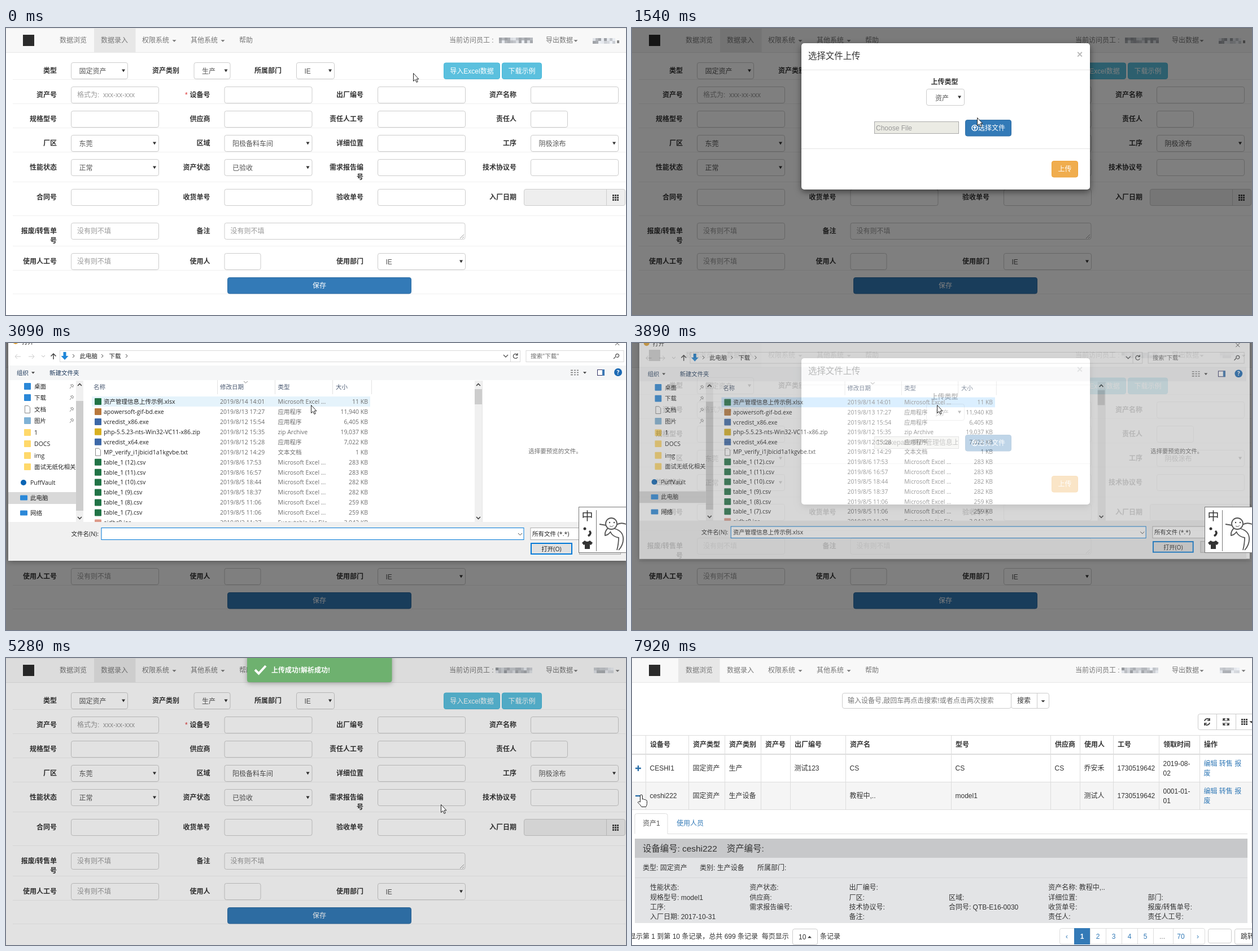
Recreate the animation shown at these times as an HTML page. Size 1098x510 px, loop 8000 ms.

```html
<!DOCTYPE html>
<html lang="zh">
<head>
<meta charset="utf-8">
<style>
html, body { margin: 0; width: 100%; height: 100%; overflow: hidden; background: #fff; }
svg { display: block; font-family: "Liberation Sans", "Noto Sans CJK SC", sans-serif; }
text { white-space: pre; }
#dialog { font-family: "Open Sans", "Noto Sans CJK SC", sans-serif; filter: drop-shadow(0 2px 5px rgba(0,0,0,.3)); }
#modal .card { filter: drop-shadow(0 4px 6px rgba(0,0,0,.5)); }
.b { font-weight: 700; }
.r { text-anchor: end; }
.m { text-anchor: middle; }
</style>
</head>
<body>
<svg id="stage" width="1098" height="510" viewBox="0 0 1098 510"></svg>
<script>
const LOOP = 8000, BLUE = '#337ab7';
const $ = id => document.getElementById(id);

// Drawing helpers; text is placed by its vertical centre
const rect = (x, y, w, h, fill, more = '') => `<rect x="${x}" y="${y}" width="${w}" height="${h}" fill="${fill}" ${more}/>`;
const box = (x, y, w, h, fill = '#fff', stroke = '#ccc', r = 3.4) => rect(x + .5, y + .5, w - 1, h - 1, fill, `stroke="${stroke}" rx="${r}"`);
const text = (x, y, s, fill = '#333', cls = '', size = 12) => `<text x="${x}" y="${y + size * .37}" fill="${fill}" class="${cls}" font-size="${size}">${s}</text>`;
const line = (d, stroke = '#ddd', w = 1) => `<path d="${d}" fill="none" stroke="${stroke}" stroke-width="${w}"/>`;
const shape = (d, fill) => `<path d="${d}" fill="${fill}"/>`;
const dot = (x, y, r, fill) => `<circle cx="${x}" cy="${y}" r="${r}" fill="${fill}"/>`;
const ring = (x, y, r, stroke, w, fill = 'none', more = '') => `<circle cx="${x}" cy="${y}" r="${r}" fill="${fill}" stroke="${stroke}" stroke-width="${w}" ${more}/>`;
const caret = (x, y, fill = '#777', w = 3.5, h = 3.5) => shape(`M${x - w} ${y - h / 2}h${2 * w}l${-w} ${h}z`, fill);
const group = (id, s, more = '') => `<g id="${id}" ${more}>${s}</g>`;
const clip = (id, x, y, w, h) => `<clipPath id="${id}">${rect(x, y, w, h, '#000')}</clipPath>`;
const button = (x, y, w, s, fill, stroke, id = '') =>
  rect(x + .5, y + .5, w - 1, 28.5, fill, `stroke="${stroke}" rx="3.4" id="${id}"`) + text(x + w / 2, y + 15, s, '#fff', 'm');
const grid = (x, y) => [0, 1, 2].map(i => [0, 1, 2].map(j => rect(x + i * 4, y + j * 4, 3, 3, '#444')).join('')).join('');

function mosaic(x, y, cols, rows, seed) {
  let s = '';
  for (let i = 0; i < cols * rows; i++) {
    seed = (seed * 1103515245 + 12345) % 2147483648;
    const v = 150 + (seed >> 12) % 90;
    s += rect(x + i % cols * 5, y + (i / cols | 0) * 5, 5, 5, `rgb(${v},${v + 3},${v + 8})`);
  }
  return s;
}

function navbar() {
  const items = [[95, '数据浏览'], [168, '数据录入'], [241, '权限系统'], [327, '其他系统'], [413, '帮助']];
  return rect(0, 0, 1098, 43, '#f8f8f8') + line('M0 43.5H1098M0 .5H1098', '#e7e7e7')
    + rect(156, 0, 73.5, 43, '#e7e7e7', 'id="active"') + rect(30, 12, 20, 20, '#2b2b2b')
    + items.map(([x, s]) => text(x, 22, s, '#777')).join('') + caret(298, 23) + caret(384, 23)
    + text(785, 22, '当前访问员工 :', '#777') + text(956, 22, '导出数据', '#777') + caret(1009, 23)
    + group('namesA', mosaic(873, 17, 12, 2, 7) + mosaic(1039, 18, 8, 2, 21) + rect(1082, 22, 4, 5, '#888'))
    + group('namesB', mosaic(867, 17, 13, 2, 33) + mosaic(1041, 17, 7, 2, 5) + caret(1083, 23));
}

function form() {
  const label = (x, y, s) => s.split('|').map((p, i) => text(x, y + 17 * i, p, '#333', 'b r')).join('');
  const input = (x, y, w, hint = '') => box(x, y - 15, w, 30) + text(x + 11, y, hint, '#999');
  const select = (x, y, w, s) => box(x, y - 15, w, 30) + text(x + 14.5, y + 1, s, '#555') + caret(x + w - 8, y, '#333', 3, 5);
  // Each cell: label, hint or ">option", width
  const rows = [
    [119, ['资产号', '格式为:  xxx-xx-xxx'], ['设备号'], ['出厂编号'], ['资产名称']],
    [162, ['规格型号'], ['供应商'], ['责任人工号'], ['责任人', '', 66]],
    [205, ['厂区', '>东莞'], ['区域', '>阳极备料车间'], ['详细位置'], ['工序', '>阴极涂布']],
    [248, ['性能状态', '>正常'], ['资产状态', '>已验收'], ['需求报告编|号'], ['技术协议号']],
    [301, ['合同号'], ['收货单号'], ['验收单号']],
    [361, ['报废/转售单|号', '没有则不填'], ['备注', '没有则不填', 427]],
    [415, ['使用人工号', '没有则不填'], ['使用人', '', 65], ['使用部门', '>IE']]
  ];
  let s = [91, 134, 177, 220, 273, 333, 387, 430, 472].map(y => line(`M12 ${y}.5H1097`, '#f0f0f0')).join('');
  for (const [y, ...cells] of rows)
    cells.forEach(([name, value = '', w = 156], i) => {
      const x = [115, 386.5, 658, 929][i];
      s += label(x - 25, y, name) + (value[0] === '>' ? select(x, y, w, value.slice(1)) : input(x, y, w, value));
    });
  return s + label(90, 76, '类型') + select(115, 76, 101, '固定资产')
    + label(307, 76, '资产类别') + select(332.5, 76, 65, '生产')
    + label(488, 76, '所属部门') + select(514, 76, 68, 'IE')
    + button(775, 61.5, 100, '导入Excel数据', '#5bc0de', '#46b8da', 'import')
    + button(878, 61.5, 71, '下载示例', '#5bc0de', '#46b8da')
    + text(317, 119, '*', '#d33') + label(904, 301, '入厂日期')
    + box(917, 286, 180, 30, '#eee') + line('M1063.5 286V316', '#ccc') + grid(1074, 296)
    + line('M804 374l7-7m-3 7l3-3', '#999') + button(392, 443, 326, '保存', BLUE, '#2e6da4');
}

function table() {
  const cols = [24, 100, 164, 228, 280, 378, 565, 741, 793, 852, 933, 1005];
  const heads = '设备号,资产类型,资产类别,资产号,出厂编号,资产名,型号,供应商,使用人,工号,领取时间,操作'.split(',');
  const filler = n => `CESHI${n},固定资产,生产,,,CS,CS,CS,测试人,1730519642,2019-08-|02`;
  const data = [
    'CESHI1,固定资产,生产,,测试123,CS,CS,CS,乔安禾,1730519642,2019-08-|02',
    'ceshi222,固定资产,生产设备,,,教程中&#44;..,model1,,测试人,1730519642,0001-01-|01',
    ...[3, 4, 5, 6].map(filler)
  ];
  const plus = y => line(`M6 ${y}h10M11 ${y - 5}v10`, '#286da8', 2.4);
  let s = box(372, 62, 300, 28) + text(382, 76, '输入设备号,敲回车再点击搜索!或者点击两次搜索', '#777')
    + box(671, 62, 68, 28) + line('M717.5 62V90', '#ccc') + text(694, 76, '搜索', '#333', 'm') + caret(728, 77, '#333')
    + box(1002, 99, 110, 29) + line('M1035.5 99V128M1069.5 99V128', '#ccc') + grid(1079, 108) + caret(1097, 114, '#333')
    + line('M1014 112a5 5 0 0 1 9-2m0-3v4h-4M1023 115a5 5 0 0 1-9 2m0 3v-4h4', '#333', 1.6)
    + line('M1047 112v-4h4m2 0h4v4m0 3v4h-4m-2 0h-4v-4M1047 108l4 4m6-4l-4 4m4 7l-4-4m-6 4l4-4', '#333', 1.5)
    + rect(0, 171, 1098, 49, '#f5f5f5', 'id="hover"')
    + line(cols.map(x => `M${x}.5 137V471`).join('') + 'M0 137.5H1098') + line('M0 171H1098', '#ddd', 2);
  heads.forEach((h, i) => s += text(cols[i] + 8, 154, h, '#333', 'b'));
  data.forEach((row, k) => {
    const y = 196 + 49 * k;
    s += line(`M0 ${y + 24.5}H1098`);
    if (k !== 1) s += plus(y);
    [...row.split(','), '编辑 转售 报|废'].forEach((cell, i) => {
      const parts = cell.split('|');
      parts.forEach((p, j) => s += text(cols[i] + 7.5, y + (parts.length > 1 ? 17 * j - 8.5 : 0), p, i === 11 ? BLUE : '#333'));
    });
  });
  s += group('plus', plus(245)) + group('detail', line('M6 245h10', '#286da8', 2.4) + detail()) + rect(0, 471, 1098, 39, '#fff');
  s += text(-5, 495, '显示第 1 到第 10 条记录，总共 699 条记录  每页显示') + box(284, 481, 45, 29)
    + text(295, 496, '10') + shape('M311 497.5h7l-3.5-3.5z', '#333') + text(333, 495, '条记录')
    + box(757, 480, 258, 29, '#fff', '#ddd') + rect(783, 480, 28, 29, BLUE)
    + line([811, 839, 867, 895, 923, 958, 989].map(x => `M${x}.5 480V509`).join(''))
    + '‹,1,2,3,4,5,...,70,›'.split(',').map((p, i) =>
      text([770, 797, 825, 853, 881, 909, 939, 972, 1002][i], 495, p, i === 1 ? '#fff' : i === 6 ? '#777' : BLUE, i === 1 ? 'm b' : 'm')).join('')
    + box(1020, 481, 42, 26) + box(1067, 481, 50, 28) + text(1078, 495, '跳转');
  return s;
}

function detail() {
  const rows = [
    '性能状态:,资产状态:,出厂编号:,,资产名称: 教程中&#44;..',
    '规格型号: model1,供应商:,厂区:,区域:,详细位置:,部门:',
    '工序:,需求报告编号:,技术协议号:,合同号: QTB-E16-0030,收货单号:,报废/转售单号:',
    '入厂日期: 2017-10-31,,备注:,,责任人:,责任人工号:'
  ];
  return rect(0, 270, 1098, 201, '#fff') + line('M0 269.5H1098M5 312.5V280q0-3.5 3.5-3.5H59.5q3.5 0 3.5 3.5V312.5H1090M1097.5 270V471')
    + text(19, 294, '资产1', '#555') + text(79, 294, '使用人员', BLUE)
    + rect(5, 321, 1085, 150, '#e3e4e6') + rect(5, 321, 1085, 34, '#c7c8ca')
    + line('M5 390.5H1090', '#d6d7d9') + text(19, 338, '设备编号: ceshi222    资产编号:', '#333', '', 15.4)
    + text(19, 373, '类型: 固定资产') + text(120, 373, '类别: 生产设备') + text(222, 373, '所属部门:')
    + rows.map((r, j) => r.split(',').map((s, i) => text(32 + 176.3 * i, 408 + 17.2 * j, s)).join('')).join('');
}

function modal() {
  return clip('pathClip', 430, 166, 147, 22)
    + `<g class="card">${rect(300, 27, 511, 260, '#fff', 'rx="5"')}</g>`
    + text(312, 49, '选择文件上传', '#333', '', 15.43) + text(793, 46, '×', '#bbb', 'b m', 18)
    + line('M300 74.5H811M300 214.5H811', '#e5e5e5') + text(553.5, 96, '上传类型', '#333', 'b m')
    + box(521, 108, 68, 30) + text(537, 125, '资产', '#555') + caret(580, 123, '#333', 3, 5)
    + box(429, 166, 150, 22, '#ebebe4', '#a9a9a9', 0)
    + group('hint', text(432, 178, 'Choose File', '#999'))
    + group('path', text(431, 177, 'C:\\fakepath\\资产管理信息上传', '#444'), 'clip-path="url(#pathClip)"')
    + button(590, 163, 82, '', BLUE, '#2e6da4') + text(613, 178, '选择文件', '#fff')
    + ring(607, 177.5, 5, '#fff', 1.5) + line('M607 181v-6m-2.5 2.5l2.5-2.5l2.5 2.5', '#fff', 1.6)
    + button(743, 236, 47, '上传', '#f0ad4e', '#eea236', 'upload');
}

function dialog() {
  const t = (x, y, s, fill = '#222', cls = '') => text(x, y, s, fill, cls, 10.5);
  const page = (x, y) => line(`M${x - 4.5} ${y - 6.5}h6l3 3v10h-9z`, '#888');
  const icon = (x, y, fill) => fill ? rect(x - 6, y - 6, 12, 12, fill, 'rx="1"') : page(x, y);
  const G = '#217346', Y = '#ffd96b', B = '#2b88d8';
  const X = 'Microsoft Excel ...';
  const files = [
    ['资产管理信息上传示例.xlsx', '14 14:01', X, '11', G], ['apowersoft-gif-bd.exe', '13 17:27', '应用程序', '11,940', '#b9783c'],
    ['vcredist_x86.exe', '12 15:54', '应用程序', '6,405', '#3c68a8'], ['php-5.5.23-nts-Win32-VC11-x86.zip', '12 15:35', 'zip Archive', '19,037', '#d8b020'],
    ['vcredist_x64.exe', '12 15:28', '应用程序', '7,022', '#3c68a8'], ['MP_verify_i1jbicid1a1kgvbe.txt', '12 14:29', '文本文档', '1', ''],
    ['table_1 (12).csv', '6 17:53', X, '283', G], ['table_1 (11).csv', '6 16:57', X, '283', G], ['table_1 (10).csv', '5 18:44', X, '282', G],
    ['table_1 (9).csv', '5 18:37', X, '282', G], ['table_1 (8).csv', '5 11:06', X, '259', G], ['table_1 (7).csv', '5 11:06', X, '259', G],
    ['aidbc8.jar', '2 11:27', 'Executable Jar File', '3,942', '#d98']
  ];
  const places = [['桌面', 77, B], ['下载', 97, B], ['文档', 118, ''], ['图片', 138, '#7fb2d6'], ['1', 159, Y], ['DOCS', 179, Y], ['img', 200, Y], ['面试无纸化相关文件', 220, Y]];
  const roots = [['PuffVault', 248], ['此电脑', 275], ['网络', 302]];
  let plain = '', color = '', list = '', side = t(43, 55.5, '快速访问') + rect(4, 265, 120, 21, '#d9d9d9');
  files.forEach(([name, date, kind, size, fill], i) => {
    const y = 104 + 17.95 * i;
    list += t(173, y, name) + t(379, y, '2019/8/' + date, '#6d6d6d') + t(481.5, y, kind, '#6d6d6d') + t(641, y, size + ' KB', '#6d6d6d', 'r');
    plain += page(163, y);
    color += icon(163, y, fill);
  });
  let sidePlain = '', sideColor = '';
  places.forEach(([s, y, fill], i) => {
    side += t(50, y, s) + (i < 4 ? line(`M113 ${y + 4}l3-4m-2-3l5 5m-4-3l2-3l3 3l-3 2`, '#888') : '');
    sidePlain += page(38, y);
    sideColor += icon(38, y, fill);
  });
  roots.forEach(([s, y], i) => {
    side += t(43, y, s);
    sideColor += i ? rect(25, y - 4.5, 13, 9, B, 'rx="1"') : dot(31, y, 5, '#0a64b4');
  });
  const late = line('M26 24H16m4-4l-4 4l4 4M40 24h10m-4-4l4 4l-4 4', '#ccc') + line('M63 22l3 3l3-3', '#bbb') + line('M84 29V19m-4.5 4.5L84 19l4.5 4.5', '#444', 1.5)
    + box(95, 13, 816, 21, '#fff', '#d9d9d9', 0) + line('M893.5 13V34', '#d9d9d9') + shape('M101.5 16h5v7h4l-6.5 7l-6.5-7h4z', '#1f86d8')
    + line('M118 20l3 3l-3 3M169 20l3 3l-3 3M212 20l3 3l-3 3', '#444') + t(158.5, 23, '此电脑') .replace('158.5', '130.5') + t(182.5, 23, '下载')
    + line('M881 21l4 4l4-4M905.5 21a4 4 0 1 0 .5 4m0-7v3.5h-3.5', '#555', 1.3)
    + box(920.5, 13, 174, 21, '#fff', '#d9d9d9', 0) + t(929, 23, '搜索"下载"', '#6d6d6d') + line('M1076 28l4-4a3 3 0 1 1 1 1', '#555', 1.3)
    + t(19, 53, '组织', '#1e395b') + caret(48, 53, '#444', 3) + t(77, 53, '新建文件夹', '#1e395b')
    + line('M1000 48.5h4m2 0h3m2 0h3M1000 52.5h4m2 0h3m2 0h3M1000 56.5h4m2 0h3m2 0h3', '#777', 1.5) + caret(1025, 53, '#444', 3)
    + t(164, 339, '文件名(N):', '#222', 'r') + box(168.5, 328, 749, 22, '#fff', '#0078d7', 0) + line('M907 338l3.5 3.5l3.5-3.5', '#444')
    + group('chosen', t(173, 339, files[0][0]))
    + box(928.5, 328, 162, 22, '#fff', '#adadad', 0) + t(932, 339, '所有文件 (*.*)')
    + rect(930, 356, 72, 19, '#e1e1e1', 'stroke="#0078d7" stroke-width="2"') + t(966, 366, '打开(O)', '#222', 'm')
    + box(1015, 355, 74, 21, '#e1e1e1', '#adadad', 0);
  return clip('listClip', 138, 67, 692, 251) + clip('sideClip', 4, 67, 120, 251)
    + rect(4, -30, 1100, 417, '#fff') + rect(4, 40, 1094, 26, '#f5f6f7') + rect(4, 318, 1094, 69, '#f0f0f0')
    + t(28, -2, '打开') + dot(17, -3, 5, '#e0a030')
    + rect(115, 330, 50, 17, '#fff', 'id="early"') + rect(169, 329, 749, 21, '#fff') + rect(929, 329, 161, 21, '#fff') + rect(929, 356, 74, 21, '#fff')
    + line('M1079 -3l7 7m0-7l-7 7', '#444') + box(1047, 47, 13, 11, '#fff', '#336', 0) + rect(1056, 47, 4, 11, '#3c78b4')
    + dot(1084, 52, 7, '#1c6ab4') + text(1084, 52, '?', '#fff', 'b m', 10)
    + line('M374.5 66V91M476.5 66V91M578.5 66V91M647.5 66V91', '#e2e2e2') + line('M421 68l3.5 3l3.5-3', '#888')
    + t(155, 78, '名称', '#4c5b73') + t(379, 78, '修改日期', '#4c5b73') + t(481.5, 78, '类型', '#4c5b73') + t(584, 78, '大小', '#4c5b73')
    + group('list', rect(152, 95, 493, 18, '#e5f3fb', 'id="row"') + list + group('plainIcons', plain) + group('colorIcons', color), 'clip-path="url(#listClip)"')
    + group('tree', group('side', side + group('plainSide', sidePlain) + group('colorSide', sideColor)), 'clip-path="url(#sideClip)"')
    + rect(124, 67, 13, 251, '#f0f0f0') + rect(124, 103, 13, 195, '#cdcdcd', 'id="thumb"') + rect(830, 67, 13, 251, '#f0f0f0') + rect(830, 82, 13, 27, '#cdcdcd')
    + line('M127 76l3.5-3.5l3.5 3.5M127 309l3.5 3.5l3.5-3.5M833 76l3.5-3.5l3.5 3.5M833 309l3.5 3.5l3.5-3.5', '#444', 1.6)
    + line('M843.5 67V318', '#e5e5e5') + t(972.5, 192, '选择要预览的文件。', '#6d6d6d', 'm') + group('late', late);
}

const ime = () => box(1014, 291, 90, 82, '#fff', '#777', 0) + text(1029.5, 308, '中', '#333', 'm', 20) + line('M1045.5 297V370', '#777')
  + dot(1025, 330, 2.5, '#333') + line('M1033 334q5 4-2 9', '#333', 3.5)
  + shape('M1020 355l5-4q4 4 9 0l5 4l-3 4l-2-1v8h-9v-8l-2 1z', '#333')
  + line('M1063 324l-12-2M1081 323q8-5 17-1M1066 329q-6 6-5 13q6-1 10-7M1078 330q14 4 15 16t-8 22M1070 335q4 9 15 11q0 10-3 22', '#555', 1.8)
  + ring(1072, 321, 10, '#555', 1.8, '#fff') + dot(1069, 319, 1.2, '#444') + dot(1077, 319, 1.2, '#444') + line('M1069 325q4 3 7-1', '#555');

$('stage').innerHTML = rect(0, 0, 1098, 510, '#fff')
  + group('form', form()) + group('table', table()) + group('nav', navbar())
  + rect(0, 0, 1098, 510, '#000', 'id="shade"') + group('modal', modal()) + group('dialog', dialog()) + group('ime', ime())
  + group('toast', rect(427, -6, 256.5, 49, '#6eb16f', 'rx="4" style="filter:drop-shadow(0 2px 4px rgba(0,0,0,.3))"')
    + line('M441 21l6.5 6.5L460 14', '#fff', 4) + text(470, 22, '上传成功!解析成功!', '#fff', 'b'))
  + group('cursor', group('arrow', '<path d="M.5.5V14.5L3.8 11.5L6 16.5L8.2 15.5L6 10.8H10z" fill="#fff" stroke="#222"/>')
    + group('hand', '<path d="M3.5 12V2q0-2 2-2t2 2v6q2-1 3 .5q2-.5 3 1q2 0 2 2v4q0 3-2 6H6Q4 18-.5 14q0-3 4-1z" fill="#fff" stroke="#222" transform="translate(-5 0)"/>')
    + group('busy', ring(17.5, 8, 5, '#2f9bd8', 2.5, 'none', 'stroke-dasharray="25 6"')));

const path = [[0, 721, 80], [210, 721, 80], [620, 803, 82], [1080, 803, 82], [1540, 611, 159], [2090, 611, 159], [2320, 617, 166], [2500, 617, 166],
  [3090, 540, 110], [3900, 540, 110], [4350, 862, 324], [4400, 862, 324], [4740, 770, 255], [4910, 770, 255], [5280, 770, 260], [5520, 770, 260],
  [6200, 118, 24], [6500, 118, 24], [7220, 14, 194], [7450, 16, 243], [LOOP, 16, 243]];
const ramp = (t, a, b) => Math.min(1, Math.max(0, (t - a) / (b - a)));
const out = p => 1 - (1 - p) ** 2;
const show = (id, on) => $(id).style.display = on ? '' : 'none';
const set = (id, key, v) => $(id).setAttribute(key, v);

function pointer(t) {
  const i = path.findIndex(p => p[0] > t), [a, b] = [path[i - 1], path[i]];
  let p = ramp(t, a[0], b[0]);
  p = p * p * (3 - 2 * p);
  return [a[1] + (b[1] - a[1]) * p, a[2] + (b[2] - a[2]) * p];
}

function draw(t) {
  const [x, y] = pointer(t), second = t >= 6440, loaded = t >= 2400;
  set('cursor', 'transform', `translate(${x} ${y})`);
  show('hand', t > 7180);
  show('arrow', t <= 7180);
  show('busy', t >= 1770 && t < 2090);
  set('busy', 'transform', `rotate(${t >= 1920 ? 120 : 0} 17.5 8)`);

  show('form', !second);
  show('table', second);
  set('active', 'x', second ? 82 : 156);
  show('namesA', t < 3000);
  show('namesB', t >= 3000);
  set('import', 'fill', t > 540 && t < 1180 ? '#31b0d5' : '#5bc0de');
  set('hover', 'y', y < 220 ? 171 : 220);
  set('hover', 'opacity', second && y > 171 ? 1 : 0);
  show('plus', t < 7830);
  show('detail', t >= 7830);

  set('shade', 'opacity', .5 * (ramp(t, 590, 740) - ramp(t, 5165, 5315)));
  const slide = out(ramp(t, 748, 1048)) - out(ramp(t, 4910, 5165));
  set('modal', 'transform', `translate(0 ${-65 * (1 - slide)})`);
  set('modal', 'opacity', ramp(t, 748, 898) - ramp(t, 4910, 5060));
  show('hint', t < 3800);
  show('path', t >= 3800);
  set('upload', 'fill', t >= 4650 ? '#ec971f' : '#f0ad4e');

  const open = ramp(t, 2220, 2357) - ramp(t, 3850, 3980);
  show('dialog', open > 0);
  set('dialog', 'opacity', open);
  set('dialog', 'transform', `translate(524 186) scale(${.945 + .055 * open}) translate(-524 -186)`);
  for (const id of ['late', 'colorIcons', 'colorSide']) show(id, loaded);
  for (const id of ['plainIcons', 'plainSide', 'early']) show(id, !loaded);
  set('side', 'transform', `translate(0 ${t < 2600 ? 33 : 0})`);
  set('thumb', 'y', t < 2600 ? 82 : 103);
  set('row', 'y', 95 + 17.95 * Math.max(0, Math.floor((y - 93) / 17.95)));
  set('row', 'fill', t > 3450 ? '#cce8ff' : '#e5f3fb');
  show('chosen', t > 3450);
  show('ime', t >= 2280 && t < 3980);

  set('toast', 'transform', `translate(0 ${-55 * (1 - out(ramp(t, 4960, 5200)) + ramp(t, 5950, 6150))})`);
}

const start = performance.now();
function frame() {
  draw((performance.now() - start) % LOOP);
  requestAnimationFrame(frame);
}
frame();
</script>
</body>
</html>
```
